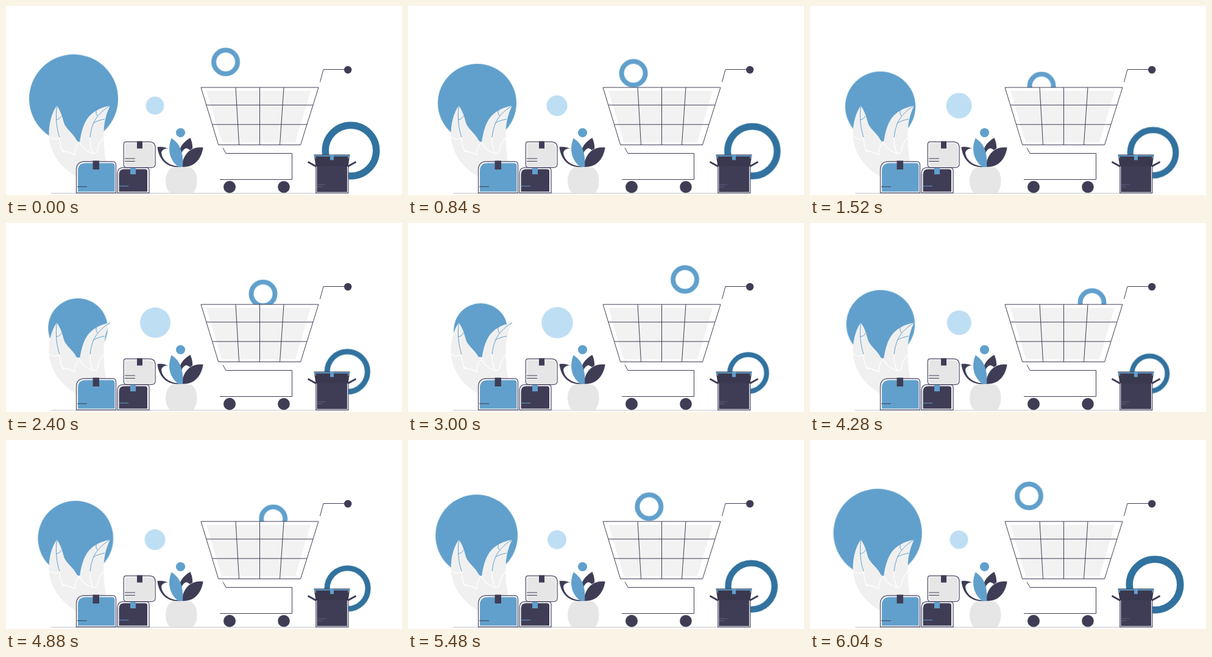
These frames come from a looping animation (650 by 311 pixels, 6080 ms). An HTML page:

```html
<!DOCTYPE html>
<html lang="en">
<head>
<meta charset="utf-8">
<title>Shopping cart</title>
<style>
  html, body { margin: 0; width: 100%; height: 100%; overflow: hidden; background: #fff; }
  svg { display: block; width: 650px; height: 311px; }

  .navy { fill: #3f3d56; }
  .blue { fill: #61a0cc; }
  .pale { fill: #bedef4; }
  .grey { fill: #e6e6e6; }
  .white { fill: #fff; }
  .skin { fill: #f0f0f0; }
  .panel { fill: #f2f2f2; }
  .line { fill: none; stroke: #3f3d56; stroke-width: 1; }
  .edge { fill: #fff; stroke: #625f78; stroke-width: 1.4; }
  .vein { fill: none; stroke: #61a0cc; stroke-width: 1; }
  .crease { fill: none; stroke: #fff; stroke-width: 1.3; }

  .sun, .bubble, .hoop, .ring { animation: 6080ms linear infinite; }
  .sun { animation-name: sun; }
  .bubble { animation-name: bubble; }
  .hoop { animation-name: hoop; fill: none; stroke: #31729f; stroke-width: 11.4; }
  .ring { animation-name: ring; fill: none; stroke: #61a0cc; stroke-width: 8; }

  @keyframes sun {
    0%, 100% { transform: translate(111px, 152.6px); }
    48% { transform: translate(119.5px, 177.1px) scale(.597); }
  }
  @keyframes hoop {
    0%, 10%, 98%, 100% { transform: translate(566px, 238px); }
    64% { transform: translate(555.5px, 250.1px) scale(.62); }
  }
  @keyframes bubble {
    0%, 100% { transform: translate(244.5px, 164px) scale(.6); }
    6% { transform: translate(244.5px, 164px) scale(.62); }
    13.8% { transform: translate(244.5px, 164px) scale(.68); }
    25% { transform: translate(244.6px, 164px) scale(.84); }
    39.5% { transform: translate(245px, 164px) scale(1); }
    47% { transform: translate(245px, 164px) scale(1.05); }
    60% { transform: translate(245px, 164px) scale(.94); }
    80% { transform: translate(244.5px, 164px) scale(.68); }
    90% { transform: translate(244.5px, 164px) scale(.62); }
  }
  @keyframes ring {
    0% { transform: translate(360.5px, 92px); }
    5% { transform: translate(363px, 96.5px); }
    10.5% { transform: translate(367px, 104.5px); }
    13.8% { transform: translate(370px, 110.5px); }
    21% { transform: translate(376.5px, 124.5px); }
    25% { transform: translate(380px, 131.5px); }
    30% { transform: translate(387px, 138px); }
    39.5% { transform: translate(422px, 116.5px); }
    42.1% { transform: translate(431px, 111.5px); }
    49.5% { transform: translate(455px, 92.5px); }
    52.6% { transform: translate(457.5px, 93.5px); }
    59.9% { transform: translate(461.5px, 106px); }
    63.2% { transform: translate(463px, 111.5px); }
    73.5% { transform: translate(463px, 139px); }
    80.3% { transform: translate(438.5px, 129.5px); }
    94.7% { transform: translate(376px, 100.5px); }
    99%, 100% { transform: translate(359.5px, 92px); }
  }
</style>
</head>
<body>
<svg viewBox="0 0 650 311">
  <defs>
    <clipPath id="above"><path d="M300 0H540V134H300Z"/></clipPath>
  </defs>

  <circle class="sun blue" r="73"/>
  <circle class="bubble pale" r="25"/>
  <circle class="hoop" r="41.800"/>
  <g clip-path="url(#above)"><circle class="ring" r="19.500"/></g>

  <path d="M74 308.300H562" stroke="#d3d3d6" stroke-width="1.600"/>

  <g id="hands">
    <path class="skin" d="M83.500 164C75 175 70 194 70.500 214C72 240 88 266 116 281V285H167C166 262 160 240 160.500 216C160 196 163 180 171 164C155 167 141 174 133 186C126 197 123 210 121 224Q118 224 116 221C110 209 98 202 95 192C92 180 89 172 83.500 164Z"/>
    <path class="vein" d="M83.500 165C81 182 83 202 88 216M82 187Q88 187 91 181M171 164C156 173 147 184 143 194Q139 204 138 216M143 193Q148 189 162 186M148 172Q147 178 150 181"/>
    <path class="crease" d="M71 215Q79 222 88 217Q88 232 95 241M91 238Q101 239 113 245Q112 232 121 224M138 216Q137 230 143 243M121 224Q126 237 139 241Q146 246 150 239Q151 227 160 217"/>
  </g>

  <g id="boxes">
    <path class="edge" d="M129 256H175Q180.500 256 180.500 262V307.500H115.500V270Q115.500 256 129 256Z"/>
    <path class="blue" d="M131 258.500H174Q178.500 258.500 178.500 263V305.500H118V271Q118 258.500 131 258.500Z"/>
    <path class="navy" d="M142.500 254.500H153V269H142.500Z"/>
    <path class="line" d="M117 297.300H133"/>

    <path class="edge" d="M192 266H230Q235 266 235 271V307.500H183V276Q183 266 192 266Z"/>
    <path class="navy" d="M194 268.500H228Q232 268.500 232 272V305.500H185.500V277Q185.500 268.500 194 268.500Z"/>
    <path class="blue" d="M204 265.500H213V277H204Z"/>
    <path class="vein" d="M186 296.300H201"/>

    <path class="edge" d="M197 223.500H235Q245 223.500 245 233V260Q245 265.700 239 265.700H198Q193.300 265.700 193.300 261V228Q193.300 223.500 197 223.500Z"/>
    <path class="grey" d="M198 225.500H234Q243 225.500 243 234V259Q243 264 238 264H199Q195.300 264 195.300 260V229Q195.300 225.500 198 225.500Z"/>
    <path class="navy" d="M215 222.500H224V234.500H215Z"/>
    <path class="line" d="M195 251H212M195 255.500H212"/>
  </g>

  <g id="plant">
    <path class="navy" d="M302.500 217C292 223 285 231 284 243L289 265C306 250 310 234 302.500 217Z"/>
    <path class="navy" d="M248.500 232C266 230 280 240 288 265C268 267 251 257 248.500 232Z"/>
    <path class="white" d="M288 265C284 249 288 236 296 234Q304 236 303 243C294 248 289 256 288 265Z"/>
    <path class="white" d="M255 241C257 235 264 233 270 236C279 243 285 253 287 264C270 264 256 255 255 241Z"/>
    <path class="navy" d="M324 232.500C305 230 290 242 288 265C308 267 321 253 324 232.500Z" stroke="#fff" stroke-width=".7"/>
    <path class="blue" d="M271.500 217.500C284 225 292 239 290 265H283C269 254 264 237 271.500 217.500Z"/>
    <path class="grey" d="M273 265.500H303C311 270 313.500 279 313.500 288Q313.500 300 307 308H269Q262 300 262 288C262 279 265 270 273 265.500Z"/>
    <circle class="blue" cx="286.500" cy="208.500" r="7.600"/>
  </g>

  <g id="cart">
    <path class="panel" d="M329 139.500H500L475 224H354Z"/>
    <path class="line" d="M320 134H513L483.500 228.500H348.700ZM329 163H504M339 195H494M377 134L382.500 228.500M416.500 134V228.500M456 134L449.500 228.500"/>
    <path class="line" d="M515.500 125L521 104.500H557M356 233.500L361 242.500H469.500V285.500H351"/>
    <circle class="navy" cx="561.200" cy="105" r="6.200"/>
    <circle class="navy" cx="367" cy="297.700" r="10"/>
    <circle class="navy" cx="456" cy="297.700" r="9.800"/>
  </g>

  <g id="open-box">
    <path class="edge" d="M508.700 262H561.800V307.500H508.700Z"/>
    <path class="navy" d="M510.300 260H560V306H510.300Z"/>
    <path d="M505.500 244.500H564.500L561.500 264H508.500Z" fill="#3a384f"/>
    <path d="M495.500 256.500L509 264M574.500 256.500L561 264" stroke="#3f3d56" stroke-width="3"/>
    <path d="M508.500 251L506.500 246.500H563.500L561.500 251" fill="none" stroke="#61a0cc" stroke-width="1.800"/>
    <path class="blue" d="M532 245H538V253.500H532Z"/>
    <path d="M511 294H524M511 297.500H519" stroke="#5f5d83" stroke-width="1"/>
  </g>
</svg>
</body>
</html>
```
